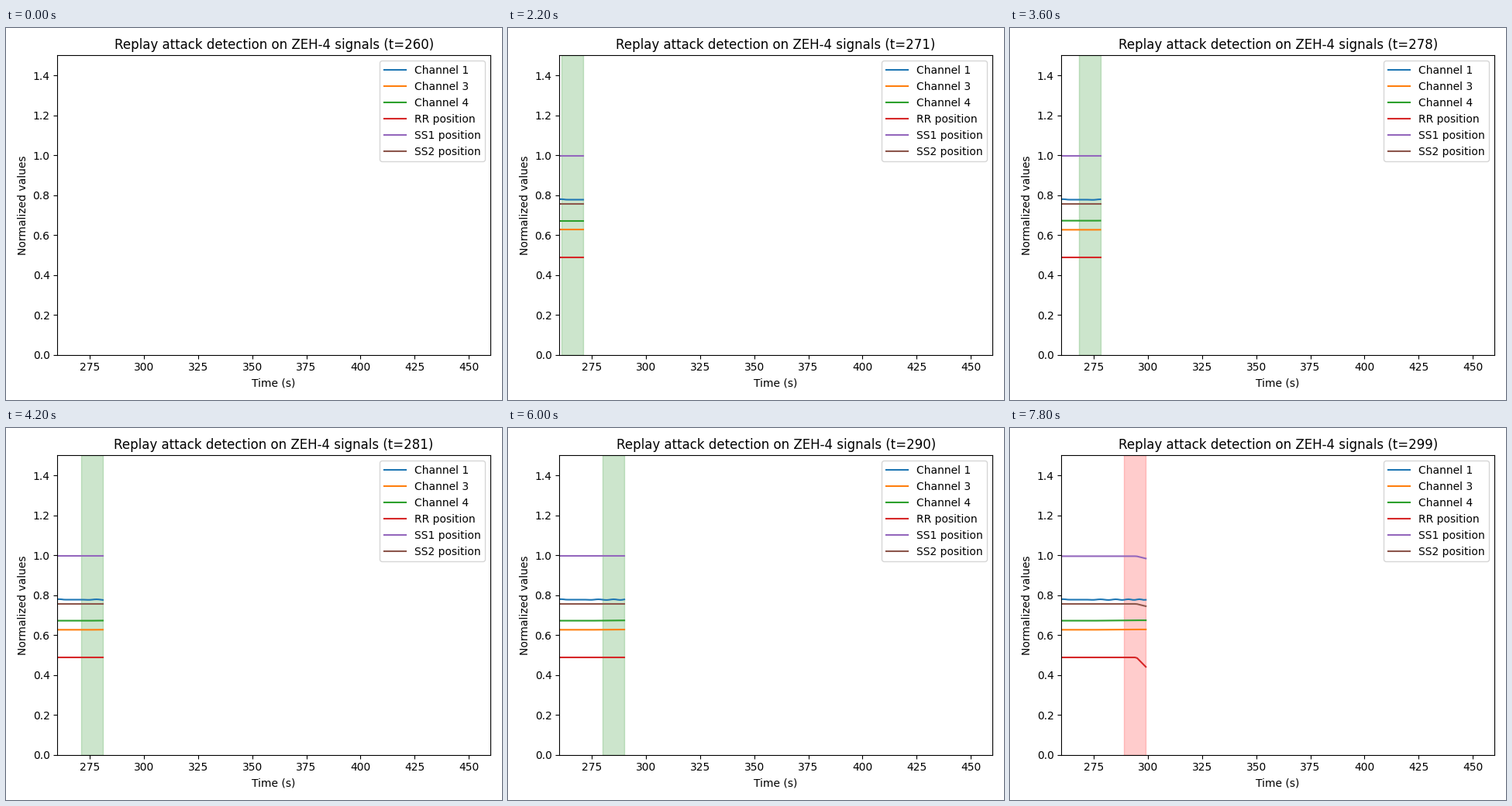
Animation, 640 px wide and 480 px high, one loop 8 s. Source, as a matplotlib script:

```python
import matplotlib.pyplot as plt
import numpy as np
from matplotlib.animation import FuncAnimation

START, SPAN, WINDOW, STEPS = 260, 200, 10, 40
DROP, ALARM = 294.7, 296

# label, resting level, slow total rise, fall per second after DROP
SIGNALS = [
    ("Channel 1", 0.7772, 0.0005, 0),
    ("Channel 3", 0.6265, 0.0015, 0),
    ("Channel 4", 0.672, 0.002, 0),
    ("RR position", 0.488, 0, 0.011),
    ("SS1 position", 0.995, 0, 0.0027),
    ("SS2 position", 0.756, 0, 0.0027),
]


def signal(level, rise, fall):
    drift = rise * np.clip((times - 276) / 20, 0, 1)
    return level + drift - fall * np.clip(times - DROP, 0, None)


def ripple():
    """Short initial settling, then a wobble that slowly speeds up."""
    s = times - 278
    wobble = np.cos(2 * np.pi * (s / 8 + 0.0023 * s ** 2))
    growth = np.clip((times - 272) / 4, 0, 1)
    settle = np.exp(-((times - START) / 2.5) ** 4)
    return 0.0018 * growth * wobble + 0.0025 * settle


times = np.arange(START, START + STEPS)
values = [signal(*spec) for _, *spec in SIGNALS]
values[0] += ripple()

plt.rcParams["font.family"] = "DejaVu Sans"
fig, ax = plt.subplots(figsize=(6.4, 4.8), dpi=100)
lines = [ax.plot([], [], label=label)[0] for label, *_ in SIGNALS]
band = ax.axvspan(START, START + WINDOW, color="green", alpha=0.2)
ax.set_xlim(START, START + SPAN)
ax.set_ylim(0, 1.5)
ax.set_xlabel("Time (s)")
ax.set_ylabel("Normalized values")
title = ax.set_title(f"Replay attack detection on ZEH-4 signals (t={START})")
ax.legend(loc="upper right")
fig.tight_layout()
fig.subplots_adjust(top=0.9264)


def update(i):
    now = START + i
    for line, ys in zip(lines, values):
        line.set_data(times[:i + 1], ys[:i + 1])
    band.set_visible(i >= WINDOW)
    band.set_x(now - WINDOW)
    band.set_color("red" if now >= ALARM else "green")
    title.set_text(f"Replay attack detection on ZEH-4 signals (t={now})")
    return [*lines, band, title]


anim = FuncAnimation(fig, update, frames=STEPS, interval=200,
                     init_func=lambda: update(0), repeat=True, repeat_delay=0)
plt.show()
```
